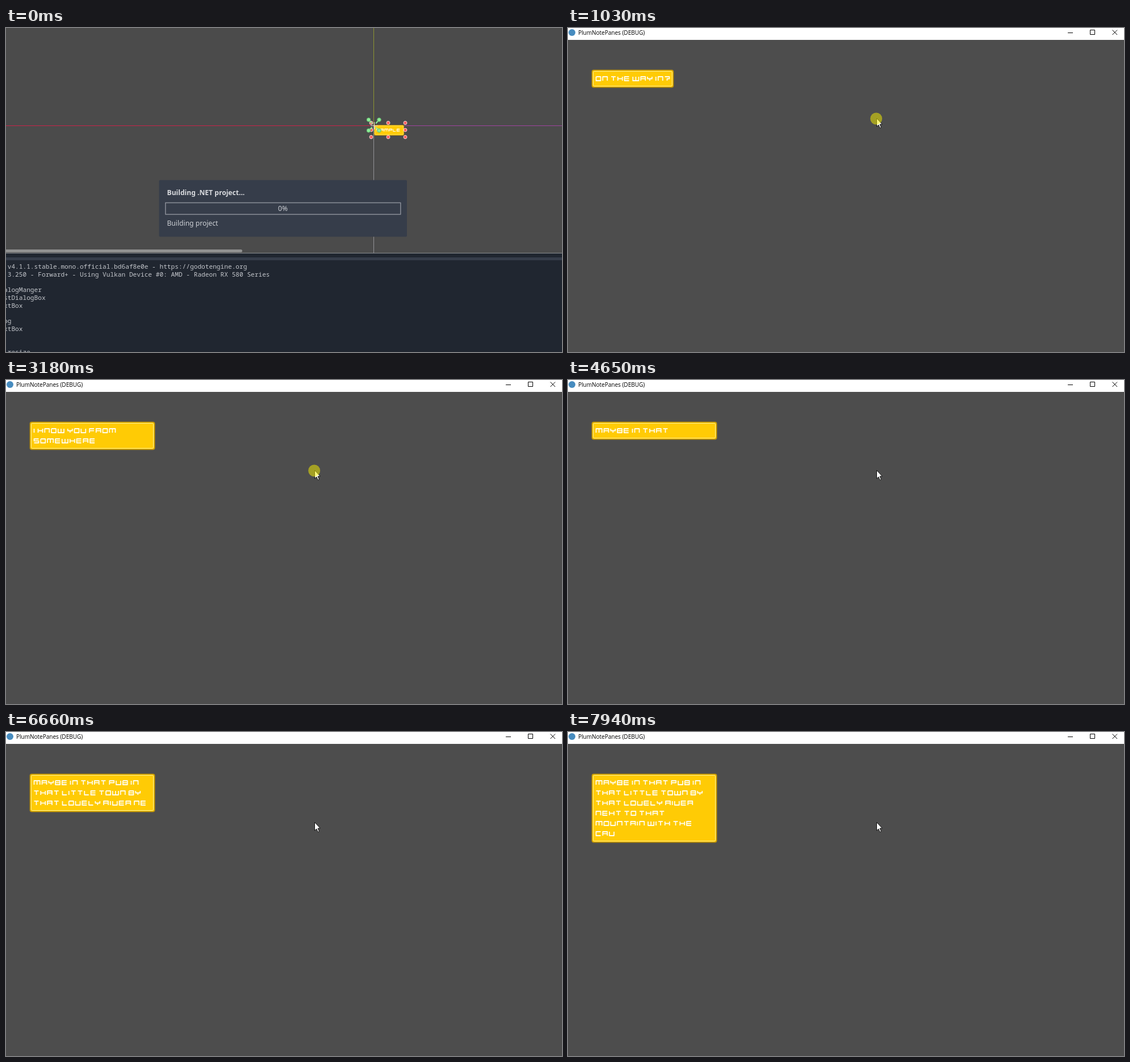
These frames come from a looping animation (979x572 px, 8000 ms). An HTML page with a canvas:

```html
<!DOCTYPE html>
<html lang="en">
<head>
<meta charset="utf-8">
<title>Dialog boxes</title>
<style>
html, body { margin: 0; width: 100%; height: 100%; overflow: hidden; background: #4d4d4d; }
canvas { display: block; }
</style>
</head>
<body>
<canvas width="979" height="572"></canvas>
<script>
const ctx = document.querySelector('canvas').getContext('2d');
const LOOP = 8000, EDITOR_END = 70;
const MAX_TEXT = 204, LINE = 18;

// Each glyph is a set of strokes over a 3x3 grid, numbered row by row.
const GLYPHS = {
  A: '6028 35', B: '02860 35', C: '2068', E: '2068 35', F: '206 35', H: '06 28 35',
  I: '06', K: '06 28 35', L: '068', M: '6028 17', N: '6028', O: '02860', P: '60253',
  R: '6028 35', S: '203586', T: '02 17', U: '0682', V: '0682', W: '0682 17',
  X: '06 28 35', Y: '0352 47', '?': '02547'
};
const ADVANCE = { ' ': 3, I: 4, L: 11.25, M: 14, W: 14 };
const advance = c => ADVANCE[c] || 11.75;
const widthOf = s => [...s].reduce((sum, c) => sum + advance(c), 0);

const LINES = [
  { start: 30, text: 'ON THE WAY IN?' },
  { start: 1045, text: 'I KNOW YOU FROM SOMEWHERE' },
  { start: 3215, text: 'HM' },
  { start: 4158, text: 'MAYBE IN THAT PUB IN THAT LITTLE TOWN BY THAT LOVELY RIVER NEXT TO THAT MOUNTAIN WITH THE CAVE' }
];
const CLICKS = [1030, 3180, 4180];

function rect(x, y, w, h, color) {
  ctx.fillStyle = color;
  ctx.fillRect(x, y, w, h);
}

function rounded(x, y, w, h, r, color) {
  ctx.beginPath();
  ctx.roundRect(x, y, w, h, r);
  ctx.fillStyle = color;
  ctx.fill();
}

function path(points, color, width) {
  ctx.beginPath();
  points.forEach(([x, y]) => ctx.lineTo(x, y));
  ctx.strokeStyle = color;
  ctx.lineWidth = width;
  ctx.stroke();
}

function dot(x, y, r, color, edge) {
  ctx.beginPath();
  ctx.arc(x, y, r, 0, 7);
  ctx.fillStyle = color;
  ctx.fill();
  if (edge) {
    ctx.strokeStyle = edge;
    ctx.lineWidth = 1;
    ctx.stroke();
  }
}

function label(text, x, y, font, color, align = 'left') {
  ctx.font = font;
  ctx.textAlign = align;
  ctx.fillStyle = color;
  ctx.fillText(text, x, y);
}

function blockText(text, x, y) {
  for (const c of text) {
    const right = advance(c) - 3.75;
    for (const stroke of (GLYPHS[c] || '').split(' ')) {
      if (!stroke) continue;
      const points = [...stroke].map(n => [x + n % 3 * right / 2, y + Math.floor(n / 3) * 3.5]);
      path(points, '#fffbe8', 1.8);
    }
    x += advance(c);
  }
}

function wrap(text) {
  const rows = [''];
  for (const word of text.split(' ')) {
    const row = rows[rows.length - 1];
    const longer = row ? row + ' ' + word : word;
    if (widthOf(longer) > MAX_TEXT) rows.push(word);
    else rows[rows.length - 1] = longer;
  }
  return rows;
}

function panel(w, rows) {
  const h = 32 + LINE * (rows.length - 1);
  rounded(0, 0, w, h, 4, '#b88f0c');
  rounded(1.5, 1.5, w - 3, h - 3, 3, '#ffcb05');
  ctx.beginPath();
  ctx.roundRect(3, 3, w - 6, h - 6, 2);
  ctx.strokeStyle = '#ffe991';
  ctx.lineWidth = 1;
  ctx.stroke();
  rows.forEach((row, i) => blockText(row, 8, 12.5 + i * LINE));
}

function typed(text, elapsed) {
  let count = 0;
  for (let due = 0; count < text.length && due <= elapsed; count++)
    due += text[count] === ' ' ? 66 : 35;
  return text.slice(0, count);
}

function drawEditor() {
  rect(0, 0, 979, 398, '#4b4b4b');
  rect(647, 0, 1, 172, '#8d9531');
  rect(647, 173, 1, 225, '#929296');
  rect(0, 172, 648, 1, '#c9234a');
  rect(648, 172, 331, 1, '#a043a0');

  ctx.save();
  ctx.translate(648, 171);
  ctx.scale(0.59, 0.59);
  panel(90, ['SAMPLE']);
  ctx.restore();

  for (const x of [643, 673, 703])
    for (const y of [167.5, 180, 192.5])
      if (x !== 673 || y !== 180) dot(x, y, 3, '#ff5d5d', '#f4dada');
  for (const x of [638.5, 657])
    for (const y of [162, 181]) {
      path([[x, y], [x + (648 - x) * 0.65, y + (172 - y) * 0.65]], '#8eef97', 2);
      dot(x, y, 3.3, '#8eef97', '#65b66e');
    }
  path([[642, 172.5], [655, 172.5]], '#e8d5d8', 1);
  path([[648.5, 166], [648.5, 179]], '#e8d5d8', 1);

  rounded(-5, 391, 421, 5, 2.5, '#929292');
  rect(0, 398, 979, 174, '#202630');
  rect(0, 397, 979, 1, '#888c92');
  rect(0, 405, 979, 5, '#363d4a');
  const log = [
    ' v4.1.1.stable.mono.official.bd6af8e0e - https://godotengine.org',
    '.3.250 - Forward+ - Using Vulkan Device #0: AMD - Radeon RX 580 Series',
    '', 'alogManger', 'stDialogBox', 'xtBox', '', 'og', 'xtBox', '', '', ' resize'
  ];
  log.forEach((row, i) =>
    label(row, -4, 425 + i * 13.75, '11.17px "Noto Sans Mono", monospace', '#c3c6cb'));

  rounded(269.5, 268.5, 436.5, 100, 2, '#363d4a');
  label('Building .NET project...', 283.5, 294.5, 'bold 12.1px "Noto Sans", sans-serif', '#d9dbdf');
  ctx.strokeStyle = '#8a8f98';
  ctx.lineWidth = 1.5;
  ctx.strokeRect(280.8, 308.5, 414, 20.5);
  label('0%', 487.5, 323, '12.1px "Noto Sans", sans-serif', '#cdd0d5', 'center');
  label('Building project', 283.5, 348.5, '12.1px "Noto Sans", sans-serif', '#cdd0d5');
}

function drawCursor(x, y) {
  ctx.beginPath();
  [[0, 0], [0, 14.5], [3.3, 11.5], [5.7, 17], [8, 16], [5.6, 10.6], [9.8, 10.4]]
    .forEach(([dx, dy]) => ctx.lineTo(x + dx, y + dy));
  ctx.closePath();
  ctx.fillStyle = '#fff';
  ctx.fill();
  ctx.strokeStyle = '#111';
  ctx.lineWidth = 1;
  ctx.stroke();
}

function drawGame(t) {
  rect(0, 0, 979, 572, '#4d4d4d');
  rect(0, 0, 979, 21, '#fff');
  dot(7, 8, 6, '#478cbf');
  label('PlumNotePanes (DEBUG)', 18, 12, '10px "Open Sans", sans-serif', '#000');
  rect(880, 8, 9, 1, '#000');
  ctx.strokeStyle = '#000';
  ctx.lineWidth = 1;
  ctx.strokeRect(919.5, 3.5, 8, 8);
  path([[958.5, 3.5], [967, 12]], '#000', 1);
  path([[967, 3.5], [958.5, 12]], '#000', 1);

  const line = LINES.findLast(l => l.start <= t);
  const full = widthOf(line.text);
  ctx.save();
  ctx.translate(41.5, 73.5);
  panel(full > MAX_TEXT ? 221 : full + 12, wrap(typed(line.text, t - line.start)));
  ctx.restore();

  const left = (1 - Math.min((t - EDITOR_END) / 350, 1)) ** 2;
  drawCursor(543.5 + 11 * left, 159.5 + 4.5 * left);
  if (CLICKS.some(c => t >= c && t < c + 70)) dot(542.7, 160, 10.5, 'rgba(245,238,0,.52)');
}

function frame(now) {
  const t = now % LOOP;
  ctx.lineJoin = 'round';
  if (t < EDITOR_END) drawEditor();
  else drawGame(t);
  requestAnimationFrame(() => frame(performance.now() - begin));
}
const begin = performance.now();
frame(0);
</script>
</body>
</html>
```
